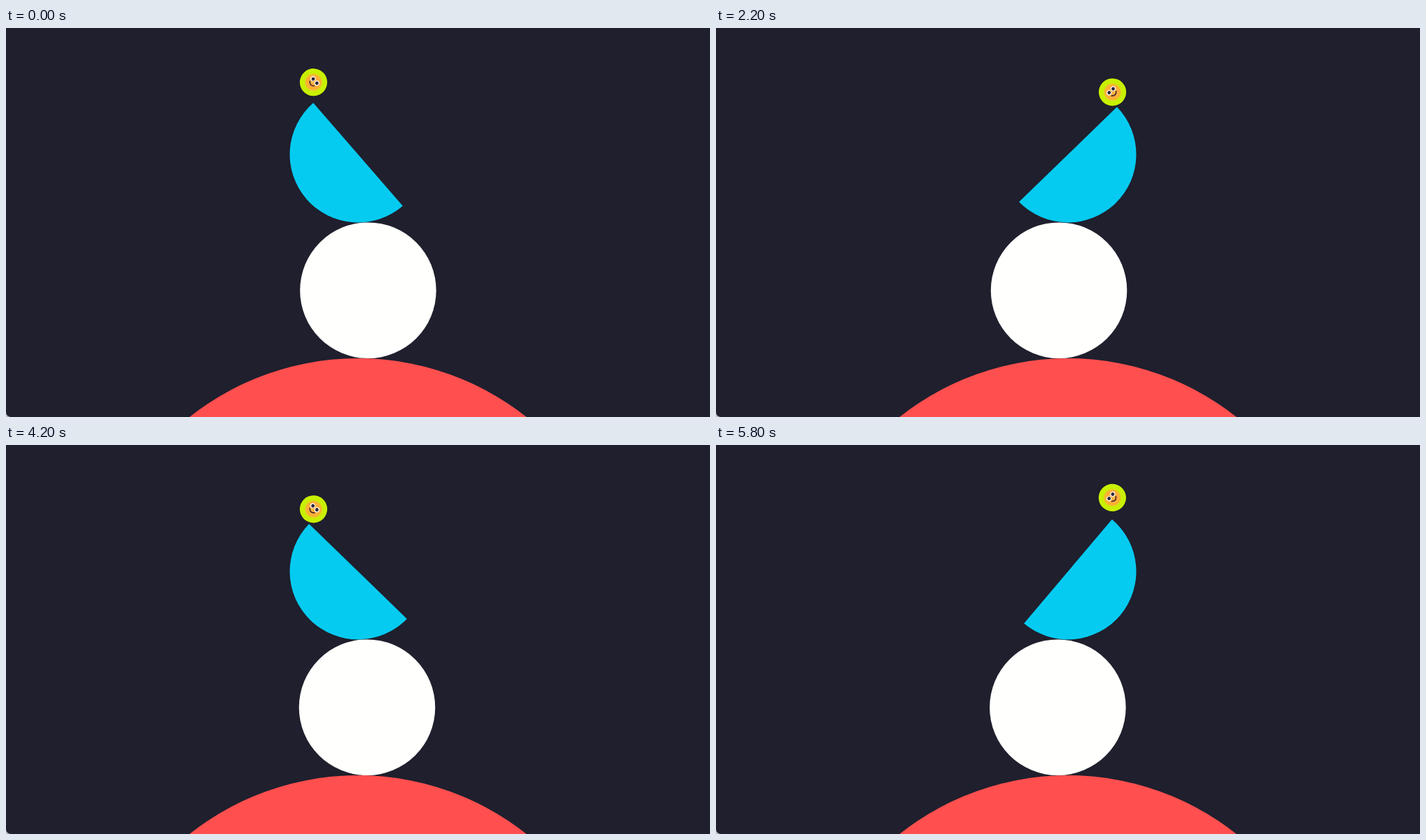
These frames come from a looping animation (1006x557 px, 6 s). An HTML page:

```html
<!DOCTYPE html>
<html lang="en">
<head>
<meta charset="utf-8">
<title>Balancing stack</title>
<style>
  html, body { margin: 0; width: 100%; height: 100%; overflow: hidden; background: #1f1f2d; }
  svg { display: block; width: 100%; height: 100%; }
</style>
</head>
<body>
<svg viewBox="0 0 1006 557">
  <defs>
    <radialGradient id="skin">
      <stop offset="0" stop-color="#ffb443"/>
      <stop offset=".53" stop-color="#ffae35"/>
      <stop offset=".66" stop-color="#c9ee06"/>
      <stop offset="1" stop-color="#c9f200"/>
    </radialGradient>
  </defs>
  <rect width="1006" height="557" fill="#1f1f2d"/>
  <circle cx="503" cy="860" r="387" fill="#ff4f4e"/>
  <circle id="drum" cy="375.7" r="97.3" fill="#fffffd"/>
  <g id="bowl">
    <path d="M-97.5 0A97.5 97.5 0 0 0 97.5 0Z" fill="#06cbf0"/>
    <g id="ball">
      <circle r="19.6" fill="url(#skin)"/>
      <g fill="#fff2e4">
        <circle cx="-4.2" cy="-2.8" r="3.7"/>
        <circle cx="4.2" cy="-2.8" r="3.7"/>
      </g>
      <g fill="#2b2437">
        <circle cx="-3.9" cy="-2.8" r="2.4"/>
        <circle cx="4.1" cy="-2.8" r="2.4"/>
      </g>
      <path d="M-4.6 2.8Q0 8 4.6 2.8" fill="none" stroke="#4a2b2b" stroke-width="1.7" stroke-linecap="round"/>
    </g>
  </g>
  <path d="M0 550V557H7A7 7 0 0 1 0 550Z" fill="#b9b9be"/>
</svg>
<script>
  const LOOP = 6000, SWING = 2000, STEP = 200, LEAD = 140;
  const [drum, bowl, ball] = ["drum", "bowl", "ball"].map(id => document.getElementById(id));

  // cubic-bezier(.42, 0, .58, 1), solved by bisection
  function easeInOut(x) {
    let lo = 0, hi = 1, s = 0.5;
    for (let i = 0; i < 24; i++) {
      const r = 1 - s;
      const bx = 1.26 * s * r * r + 1.74 * s * s * r + s * s * s;
      if (bx < x) lo = s; else hi = s;
      s = (lo + hi) / 2;
    }
    return s * s * (3 - 2 * s);
  }

  // From 1 to -1 and back
  function swing(t) {
    const p = ((t + LEAD) / SWING) % 2;
    return 1 - 2 * easeInOut(p > 1 ? 2 - p : p);
  }

  function draw(t) {
    const k = swing(t);
    drum.setAttribute("cx", 503 + 14.7 * k);
    bowl.setAttribute("transform", `translate(503 181) rotate(${50 * k})`);
    ball.setAttribute("transform", `translate(${-122 * k} -19.7)`);
  }

  function tick() {
    const t = performance.now() % LOOP;
    draw(Math.floor(t / STEP) * STEP);
    requestAnimationFrame(tick);
  }
  tick();
</script>
</body>
</html>
```
